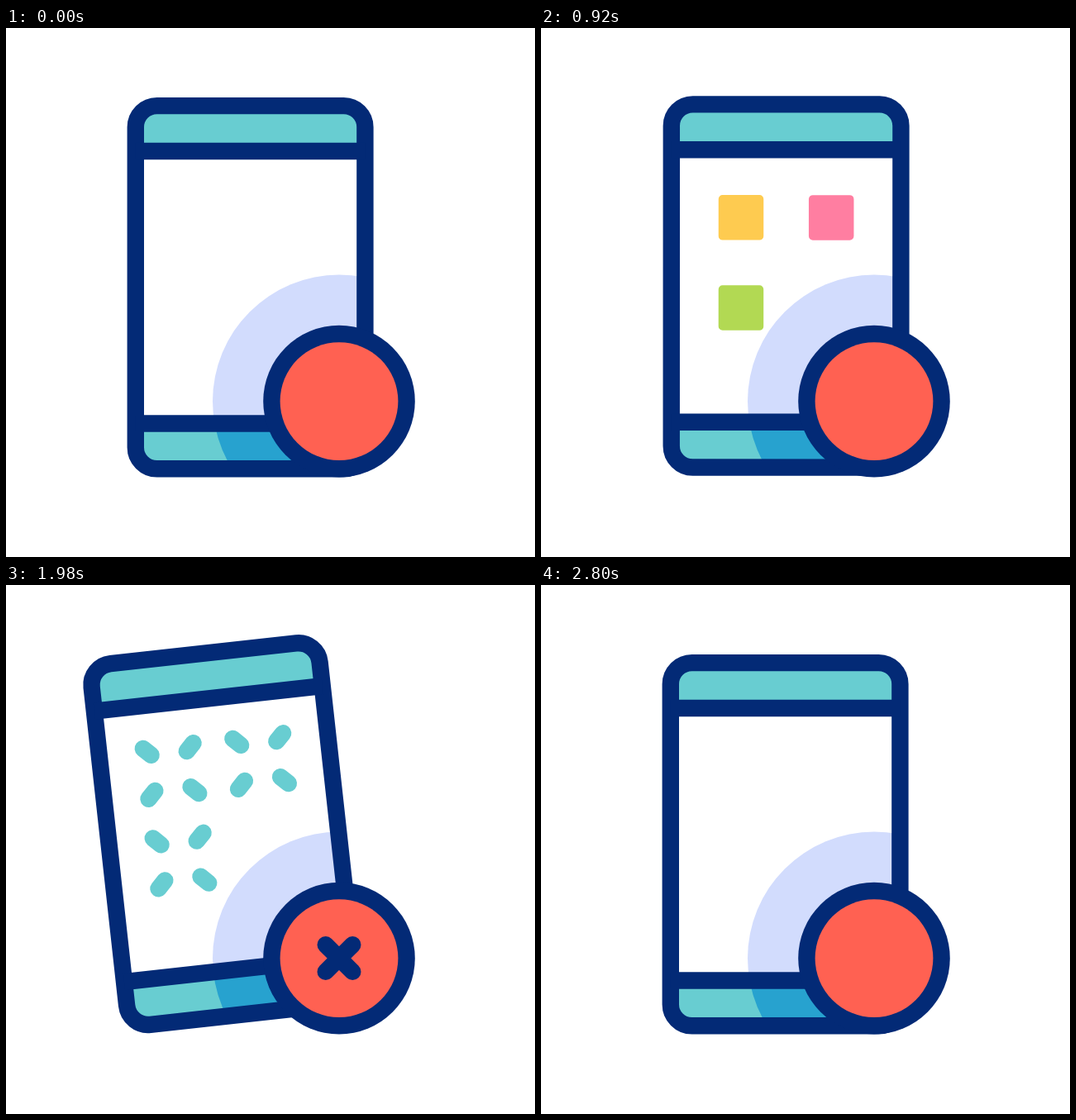
An HTML page with a canvas for the animation above (3.6 s loop, 640 by 640 pixels).

```html
<!DOCTYPE html>
<html lang="en">
<head>
<meta charset="utf-8">
<title>Phone clean-up</title>
<style>
  html, body { margin: 0; width: 100%; height: 100%; overflow: hidden; background: #fff; }
  canvas { display: block; width: 640px; height: 640px; }
</style>
</head>
<body>
<canvas width="640" height="640"></canvas>
<script>
const ctx = document.querySelector('canvas').getContext('2d');
const NAVY = '#032a76', TEAL = '#68cdd1', RED = '#ff6152';
const LOOP = 3600, LINE = 20.4;
const PHONE = { x: 295.6, y: 313.7, w: 138.8, h: 219.6, r: 25.8, bar: 164.75 };
const BADGE = { x: 403, y: 451.6 };
const APPS = [
  { x: -54.6, y: -82.6, color: '#fecb50' },
  { x: 54.6, y: -82.6, color: '#ff7ea1' },
  { x: -54.6, y: 26.6, color: '#b2d953' }
];

const progress = (t, a, b) => Math.min(1, Math.max(0, (t - a) / (b - a)));
const smooth = p => p * p * (3 - 2 * p);
const ease = (t, a, b) => smooth(progress(t, a, b));

// Leaves rest gently, reaches the peak with a little speed, then settles back.
function swing(t, start, peak, end) {
  if (t >= peak) return 1 - ease(t, peak, end);
  const p = progress(t, start, peak);
  return smooth(p) - 0.3 * p * p * (1 - p);
}

function phonePose(t) {
  if (t < 1300) {
    return {
      angle: 8 * swing(t, 0, 540, 930),
      x: 38.5 * swing(t, 0, 540, 960),
      y: -21.5 * swing(t, 0, 540, 1000)
    };
  }
  const s = swing(t, 1560, 2240, 2720);
  return { angle: -10 * s, x: -52 * s, y: -20 * s };
}

function disc(r, color) {
  ctx.beginPath();
  ctx.arc(BADGE.x, BADGE.y, r, 0, Math.PI * 2);
  ctx.fillStyle = color;
  ctx.fill();
}

function line(x1, y1, x2, y2) {
  ctx.beginPath();
  ctx.moveTo(x1, y1);
  ctx.lineTo(x2, y2);
  ctx.stroke();
}

function bodyPath() {
  ctx.beginPath();
  ctx.roundRect(-PHONE.w, -PHONE.h, PHONE.w * 2, PHONE.h * 2, PHONE.r);
}

function barsPath() {
  const height = PHONE.h - PHONE.bar;
  ctx.beginPath();
  ctx.roundRect(-PHONE.w, -PHONE.h, PHONE.w * 2, height, [PHONE.r, PHONE.r, 0, 0]);
  ctx.roundRect(-PHONE.w, PHONE.bar, PHONE.w * 2, height, [0, 0, PHONE.r, PHONE.r]);
}

// The halo stays with the badge but shows only inside the moving shape.
function clippedHalo(path, color) {
  ctx.save();
  path();
  ctx.clip();
  ctx.setTransform(1, 0, 0, 1, 0, 0);
  disc(153, color);
  ctx.restore();
}

function drawApps(t) {
  const size = 54.5 * ease(t, 200, 410) * (1 - ease(t, 1560, 1670));
  if (size < 0.1) return;
  for (const app of APPS) {
    ctx.beginPath();
    ctx.roundRect(app.x - size / 2, app.y - size / 2, size, size, size * 0.09);
    ctx.fillStyle = app.color;
    ctx.fill();
  }
}

function drawBursts(t) {
  if (t <= 1690 || t >= 2160) return;
  const reach = p => (12 + 32.5 * p) * Math.SQRT1_2;
  const head = reach(ease(t, 1680, 2020));
  const tail = reach(ease(t, 1760, 2160));
  ctx.strokeStyle = TEAL;
  ctx.lineCap = 'round';
  for (const { x, y } of APPS)
    for (const i of [-1, 1])
      for (const j of [-1, 1])
        line(x + i * tail, y + j * tail, x + i * head, y + j * head);
}

function drawPhone(t) {
  const pose = phonePose(t);
  ctx.save();
  ctx.translate(PHONE.x + pose.x, PHONE.y + pose.y);
  ctx.rotate(pose.angle * Math.PI / 180);
  barsPath();
  ctx.fillStyle = TEAL;
  ctx.fill();
  clippedHalo(bodyPath, '#d2dcfd');
  // Restore the bar tint beneath the darker halo.
  barsPath();
  ctx.fillStyle = TEAL;
  ctx.fill();
  clippedHalo(barsPath, '#27a2cf');
  drawApps(t);
  ctx.lineWidth = LINE;
  drawBursts(t);
  ctx.strokeStyle = NAVY;
  ctx.lineCap = 'butt';
  bodyPath();
  ctx.stroke();
  for (const y of [-PHONE.bar, PHONE.bar]) line(-PHONE.w, y, PHONE.w, y);
  ctx.restore();
}

function drawCross(t) {
  const scale = ease(t, 1100, 1300) * (1 - ease(t, 2610, 2800));
  if (scale < 0.01) return;
  ctx.save();
  ctx.translate(BADGE.x, BADGE.y);
  ctx.scale(scale, scale);
  ctx.strokeStyle = NAVY;
  ctx.lineWidth = LINE;
  ctx.lineCap = 'round';
  const a = 16.3;
  line(-a, -a, a, a);
  line(-a, a, a, -a);
  ctx.restore();
}

function draw(t) {
  ctx.fillStyle = '#fff';
  ctx.fillRect(0, 0, 640, 640);
  drawPhone(t);
  disc(91.8, NAVY);
  disc(71.4, RED);
  drawCross(t);
}

let start;
function tick(now) {
  start ??= now;
  draw((now - start) % LOOP);
  requestAnimationFrame(tick);
}
draw(0);
requestAnimationFrame(tick);
</script>
</body>
</html>
```
